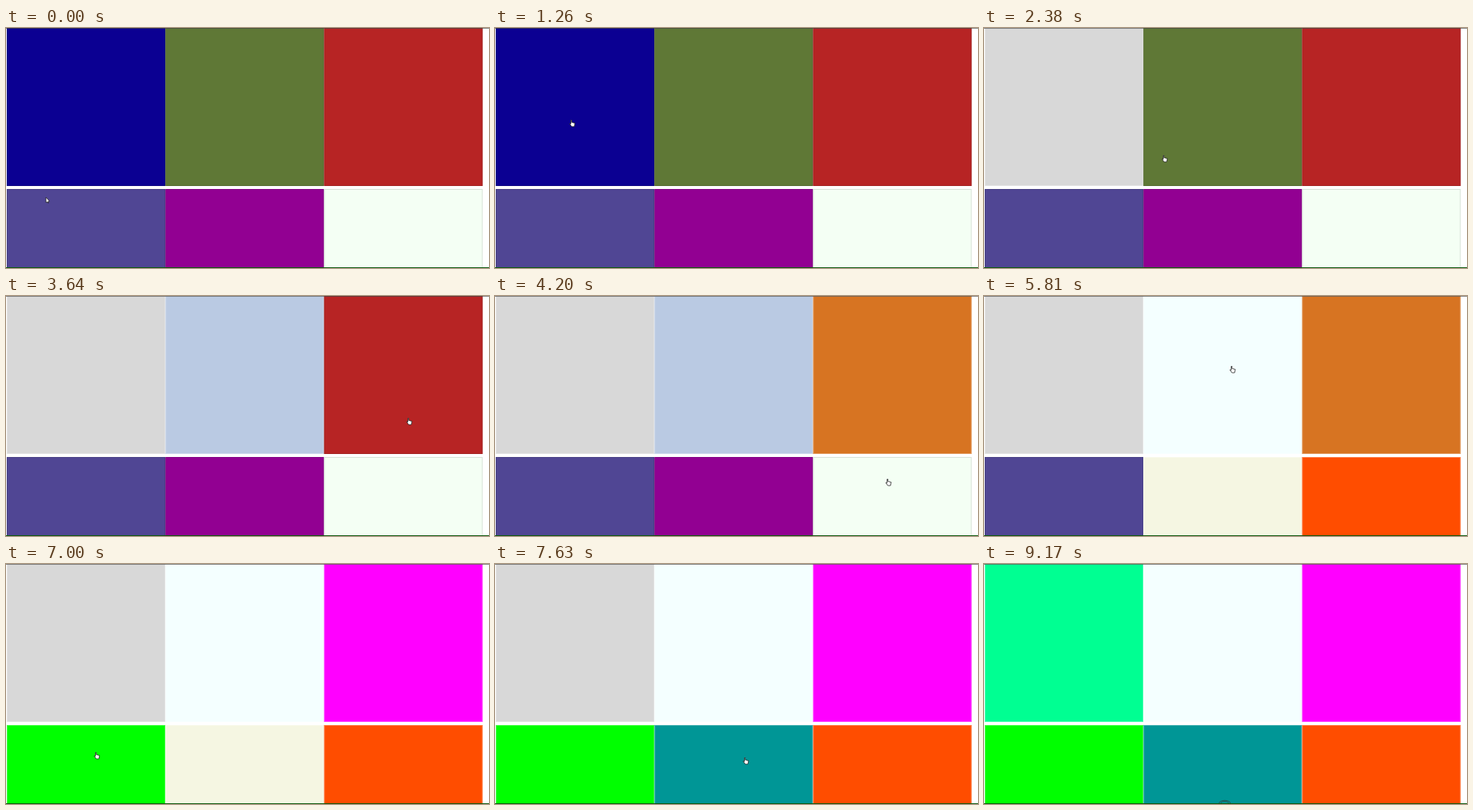
Animation, 640 px wide and 319 px high, one loop 9240 ms. Source, as an HTML page with a canvas:

```html
<!DOCTYPE html>
<html lang="en">
<head>
<meta charset="utf-8">
<title>Colour tiles</title>
<style>
  html, body { margin: 0; width: 100%; height: 100%; overflow: hidden; background: #fff; }
  canvas { display: block; width: 640px; height: 319px; }
</style>
</head>
<body>
<canvas id="stage" width="640" height="319"></canvas>
<script>
const ctx = document.getElementById('stage').getContext('2d');
const LOOP = 9240, STEP = 70, REST = 140, PITCH = 210.2, ROW = 214;

const START = ['#0b0092', '#5f7836', '#b72424', '#504694', '#920092', '#f4fff4'];

// The pointer visits each stop and gives the tile under it a new colour
const STOPS = [
  { t: 0, x: 55, y: 229 },
  { t: 1610, x: 105, y: 120, color: '#d8d8d8' },
  { t: 2450, x: 239, y: 174, color: '#bacae3' },
  { t: 3710, x: 534, y: 167, color: '#d77422' },
  { t: 4410, x: 520, y: 255, color: '#ff4d00' },
  { t: 4970, x: 323, y: 249, color: '#f5f6e2' },
  { t: 5670, x: 329, y: 98, color: '#f4ffff' },
  { t: 6370, x: 500, y: 120, color: '#ff00ff' },
  { t: 6930, x: 120, y: 255, color: '#00ff00' },
  { t: 7560, x: 332, y: 262, color: '#009696' },
  { t: 8260, x: 120, y: 130, color: '#00ff92' },
  { t: 9030, x: 319, y: 330 }
];

const tileAt = (x, y) => Math.floor((x - 1) / PITCH) + (y < ROW ? 0 : 3);

// Ease between stops, resting briefly before and after each one
function pointerAt(t) {
  const i = STOPS.findIndex(s => s.t > t);
  if (i < 0) return null;
  const a = STOPS[i - 1], b = STOPS[i];
  const raw = (t - a.t - REST) / (b.t - a.t - 2 * REST);
  const k = Math.min(1, Math.max(0, raw)), e = k * k * (3 - 2 * k);
  return [Math.round(a.x + (b.x - a.x) * e), Math.round(a.y + (b.y - a.y) * e)];
}

function rect(color, x, y, w, h) {
  ctx.fillStyle = color;
  ctx.fillRect(x, y, w, h);
}

function drawTile(i, color) {
  const x = 1 + PITCH * (i % 3), y = i < 3 ? 0 : ROW, h = i < 3 ? 210 : 105;
  rect(color, x, y, PITCH, h);
  // Untouched tiles have a dark rim, repainted ones a light rim
  ctx.strokeStyle = color === START[i] ? 'rgba(0,0,0,0.12)' : 'rgba(255,255,255,0.3)';
  ctx.lineWidth = 1;
  ctx.strokeRect(x + 0.5, y + 0.5, PITCH - 1, h - 1);
}

function drawPointer(points, x, y) {
  ctx.beginPath();
  points.forEach(([px, py]) => ctx.lineTo(x + px, y + py));
  ctx.closePath();
  ctx.fillStyle = '#fff';
  ctx.strokeStyle = '#222';
  ctx.lineWidth = 0.8;
  ctx.fill();
  ctx.stroke();
}

const ARROW = [[-2, -4], [-2, 3], [0, 2], [1, 4], [1, 1.4], [2.6, 1.2]];
const HAND = [[-1.5, -4.5], [-0.3, -4.5], [-0.3, -1.6], [4, -0.5], [3, 4], [-0.5, 4], [-3.2, 0], [-1.5, 0.4]];

// Top of a round badge peeking in from the bottom edge
function drawBadge() {
  ctx.strokeStyle = 'rgba(50,60,60,0.7)';
  ctx.lineWidth = 1;
  for (const r of [5, 7.5]) {
    ctx.beginPath();
    ctx.ellipse(319, 318, r, r / 2, 0, Math.PI, 2 * Math.PI);
    ctx.stroke();
  }
}

function draw(t) {
  rect('#fff', 0, 0, 640, 319);
  const colors = START.slice();
  for (const s of STOPS) if (s.color && t >= s.t) colors[tileAt(s.x, s.y)] = s.color;
  colors.forEach((c, i) => drawTile(i, c));

  rect('rgba(70,70,70,0.65)', 0, 0, 640, 1);
  rect('#0a580a', 0, 318, 640, 1);

  const p = pointerAt(t);
  if (p) drawPointer(t < STEP ? ARROW : HAND, ...p);
  if (t >= LOOP - STEP) drawBadge();
}

function tick() {
  const t = performance.now() % LOOP;
  draw(Math.floor(t / STEP) * STEP);
  requestAnimationFrame(tick);
}
tick();
</script>
</body>
</html>
```
